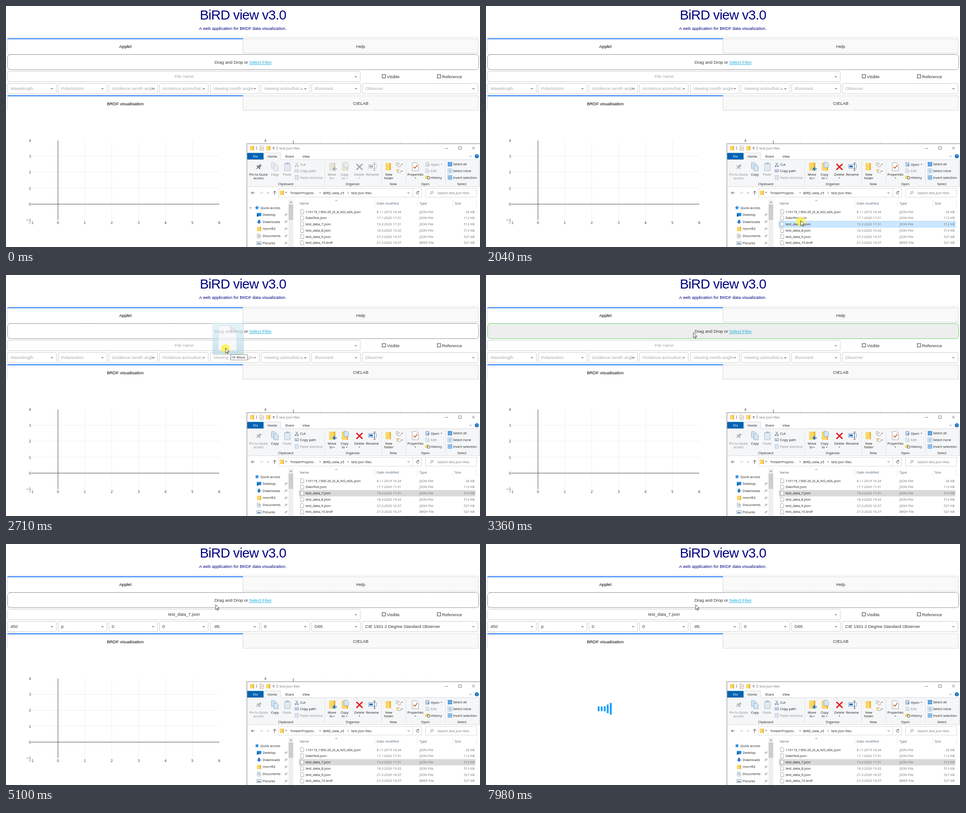
Recreate the animation shown at these times as an HTML page. Size 1049x534 px, loop 8 s.

```html
<!DOCTYPE html>
<html lang="en">
<head>
<meta charset="utf-8">
<title>BRDF viewer</title>
<style>
  html, body { margin: 0; width: 100%; height: 100%; overflow: hidden; background: #fff; }
  svg { display: block; width: 100%; height: 100%; }
  text { font: 9.6px "Liberation Sans", Arial, sans-serif; fill: #333; white-space: pre; }
  .mid { text-anchor: middle; }
  .end { text-anchor: end; }
  .title { font-size: 29.5px; letter-spacing: -.656px; fill: navy; }
  .sub { font-size: 9.46px; fill: navy; }
  .black { fill: #000; }
  .link { fill: #1eaedb; text-decoration: underline; }
  .hint { fill: #aaa; }
  .plot text { font: 7.87px "DejaVu Sans", Verdana, sans-serif; fill: #444; }
  .win text { font: 7.4px "Open Sans", "Noto Sans", sans-serif; fill: #1a1a1a; }
  .win .soft { fill: #707070; }
  .win .head { fill: #4c607a; }
  .win .white { fill: #fff; }
  .needs { opacity: .55; filter: grayscale(.75); }
  .picked .needs { opacity: 1; filter: none; }
  .never, .picked .pin { opacity: .5; }
  .cross { stroke: #5b6b85; }
  .picked .cross { stroke: #e0141c; }
</style>
</head>
<body>
<svg id="stage" viewBox="0 0 1049 534"></svg>
<script>
const LOOP = 8000;
const text = (x, y, s, cls = '') => `<text x="${x}" y="${y}" dy=".35em" class="${cls}">${s}</text>`;
const rect = (x, y, w, h, fill = 'none', stroke = 'none', more = '') =>
  `<rect x="${x}" y="${y}" width="${w}" height="${h}" fill="${fill}" stroke="${stroke}" ${more}/>`;
const path = (d, stroke = '#444', fill = 'none', more = '') =>
  `<path d="${d}" stroke="${stroke}" fill="${fill}" ${more}/>`;
const group = (attrs, ...parts) => `<g ${attrs}>${parts.join('')}</g>`;
const range = (a, b) => Array.from({ length: b - a + 1 }, (_, i) => a + i);
const caret = (x, y, color = '#999', r = 3.3) => path(`M${x - r} ${y}h${2 * r}l${-r} ${r}z`, 'none', color);
const chevron = (x, y, dx, dy, color = '#555') =>
  path(dx ? `M${x - dx} ${y - 2}l${2 * dx} 2l${-2 * dx} 2` : `M${x - 2.5} ${y - dy}l2.5 ${2 * dy}l2.5 ${-2 * dy}`, color);

/* ---- web page ---- */
function tabs(y, left, right) {
  return rect(524.5, y + .5, 520.5, 32, '#f9f9f9', '#d6d6d6') +
    path(`M3.5 ${y}v33`, '#d6d6d6') + rect(3, y - .5, 521.5, 2, '#1975fa') +
    text(264, y + 18, left, 'mid black') + text(785, y + 17.5, right, 'mid');
}

function dropdown(x, y, w) {
  return rect(x + .5, y + .5, w, 23, '#fff', '#ccc', 'rx="2.6"');
}

const columns = [3, 115, 227, 339, 452, 564, 676, 788];
const hints = ['Wavelength', 'Polarization', 'Incidence zenith angle', 'Incidence azimuthal...',
  'Viewing zenith angle', 'Viewing azimuthal a...', 'Illuminant', 'Observer'];
const values = ['450', 'p', '0', '0', '-85', '0', 'D65', 'CIE 1931 2 Degree Standard Observer'];
const rowTexts = (list, cls) => list.map((s, i) => text(columns[i] + 7, 183, s, cls)).join('');

function checkbox(x, label) {
  return rect(x + .5, 152, 7.5, 7.5, '#fff', '#333') + text(x + 11, 156.5, label);
}

function plot(id, dx) {
  const px = v => 115 + 59.5 * v, py = v => 439 - 35.25 * v;
  const name = v => v < 0 ? '−' + -v : v;
  return group(`id="${id}" class="plot" transform="translate(${dx})"`,
    path(range(1, 5).map(v => `M${px(v)} 298V474`).join('') +
      range(1, 3).map(v => `M56 ${py(v)}H472`).join(''), '#eee'),
    path('M115 298V474M56 439H472', '#444'),
    ...range(-1, 4).map(v => text(55.5, py(v), name(v), 'end')),
    ...range(-1, 6).map(v => text(px(v), 480.5, name(v), 'mid')));
}

const loader = (id, x) => group(`id="${id}"`,
  ...range(0, 4).map(i => rect(x + 6.7 * i, 0, 4, 10, '#119dff')));

const page =
  text(524.5, 20, 'BiRD view v3.0', 'mid title') +
  text(524, 50, 'A web application for BRDF data visualization.', 'mid sub') +
  path('M3 69H1045', '#e1e1e1') + tabs(72, 'Applet', 'Help') +
  rect(3.5, 107.5, 1042.5, 33.5, '#fff', '#333', 'id="zone"') +
  group('id="prompt"', text(461.5, 125, 'Drag and Drop or'), text(538, 125, 'Select Files', 'link')) +
  loader('zoneLoader', 508.4) +
  group('id="lower"',
    dropdown(3, 144, 780.5), caret(774, 155.5),
    columns.map((x, i) => dropdown(x, 171, i < 7 ? 108 : 256)).join(''),
    group('id="hints"', text(394, 156, 'File name', 'mid hint'), rowTexts(hints, 'hint')),
    group('id="values"', text(394, 156, 'test_data_7.json', 'mid'), rowTexts(values, ''),
      path('M956 155.5l2 2.2l3.8-4.5', '#222', 'none', 'stroke-width="1.3"')),
    columns.map((x, i) => caret(x + (i < 7 ? 98.5 : 246.5), 182)).join(''),
    checkbox(832, 'Visible'), checkbox(954, 'Reference'),
    tabs(198.5, 'BRDF visualisation', 'CIELAB'),
    plot('plotA', 0), plot('plotB', 521)) +
  loader('plotLoader', 247.3);

/* ---- file window ---- */
const folder = (x, y, w, h) =>
  rect(x, y, w, h, '#fbd667') + path(`M${x + w * .7} ${y}h${w * .3}v${h}h${-w * .2}z`, 'none', '#e8b53c');
const sheet = (x, y, w, h, fill = '#fff', stroke = '#8b8b8b') =>
  path(`M${x} ${y}h${w * .65}l${w * .35} ${w * .35}V${y + h}h${-w}z`, stroke, fill, 'stroke-width=".8"');
const tick = (x, y, k) => path(`M${x} ${y}l${2 * k} ${2.5 * k}l${4 * k} ${-5 * k}`, '#c4501b', 'none', `stroke-width="${k * 1.2}"`);
const pages = (x, y) => sheet(x, y, 10, 13, '#d5e6f5', '#7d9cbc') + sheet(x + 5, y + 5, 10, 13, '#d5e6f5', '#7d9cbc');
const drop = (x, y) => caret(x, y, '#333', 1.7);

const titleBar =
  folder(540, 310, 9, 10) + path('M554.5 311v8M600 311v8', '#777') + sheet(562, 310, 8, 10) + tick(563.5, 315, .8) +
  folder(576, 310, 9, 10) + path('M590 314h4.5', '#333') + drop(592.2, 316) +
  text(605, 315, 'test json files', 'soft') +
  path('M971.5 315.5h7M1001.5 312h6v6h-6zM1031.5 312l6 6m0-6l-6 6', '#555', 'none', 'stroke-width=".8"') +
  rect(534, 325.5, 36, 15, '#0063b1') + text(552, 333, 'File', 'mid white') +
  rect(534, 340.5, 515, 60, '#f5f6f7', '#dadbdc') + path('M571.5 341v-15.5h36.5V341', '#dadbdc', '#f5f6f7') +
  text(589.5, 333, 'Home', 'mid') + text(627.5, 333, 'Share', 'mid') + text(664, 333, 'View', 'mid') +
  chevron(1028, 333, 0, -1.2, '#777') +
  '<circle cx="1042" cy="333" r="4.6" fill="#1272c8"/>' + text(1042, 333, '?', 'mid white');

const ribbon =
  group('class="pin"', path('M552 362l5-5-3-2 2-2 3 1 3-4 4 4-4 3 1 3-2 2-2-3z', 'none', '#7d8288'),
    text(559, 373, 'Pin to Quick', 'mid'), text(559, 381.5, 'access', 'mid')) +
  group('class="needs"', pages(587.5, 347), text(595, 373, 'Copy', 'mid'),
    path('M641 347l5 7m0-7l-5 7', '#4a6da0'), '<circle cx="641" cy="355" r="1.3" fill="none" stroke="#4a6da0"/><circle cx="646" cy="355" r="1.3" fill="none" stroke="#4a6da0"/>',
    text(651, 351, 'Cut'), rect(639.5, 362.5, 8, 5, '#fff', '#4a6da0', 'stroke-width=".8"'), path('M641 365.5h5', '#4a6da0'), text(651, 365.5, 'Copy path')) +
  group('class="never"', rect(616.5, 349, 12.5, 16, '#cfdff0', '#5f7fa5'), rect(619.5, 347, 6.5, 3.5, '#5f7fa5'),
    text(622, 373, 'Paste', 'mid'), rect(640, 375.5, 7, 8.5, '#dbe8f5', '#4a6da0', 'stroke-width=".8"'), path('M641.5 381l3.5-3', '#1272c8'), text(651, 380, 'Paste shortcut')) +
  group('class="needs"', folder(715, 347, 14, 18), path('M732 361h-7m3-4l-4 4 4 4', '#1878cc', 'none', 'stroke-width="2.2"'),
    text(721.5, 373, 'Move', 'mid'), text(719.5, 381.5, 'to', 'mid'), drop(726, 381),
    folder(743, 347, 14, 18), sheet(748, 346, 10, 12, '#d5e6f5', '#7d9cbc'),
    text(749, 373, 'Copy', 'mid'), text(746.5, 381.5, 'to', 'mid'), drop(754, 381),
    path('M775.5 350l13.5 13m0-13l-13.5 13', null, 'none', 'class="cross" stroke-width="2.8"'), text(782, 373, 'Delete', 'mid'), drop(782, 380.5),
    rect(802.5, 351.5, 17, 8, '#fff', '#7d94b5'), rect(804, 353.5, 8, 4, '#1878cc'), path('M813 348h5m-2.5 0v16m-2.5 0h5', '#44546c'),
    text(811, 373, 'Rename', 'mid')) +
  folder(840, 348, 12, 16) + text(847, 373, 'New', 'mid') + text(847, 381.5, 'folder', 'mid') +
  group('', sheet(864, 347, 6, 6), sheet(867, 350, 6, 6), drop(876.5, 350), folder(864, 362, 5, 6), sheet(867, 363, 6, 6), drop(876.5, 365)) +
  sheet(899, 347, 14, 18) + tick(902, 356, 1.4) + text(906, 373, 'Properties', 'mid') + drop(906, 380.5) +
  group('class="needs"', rect(929, 347, 7, 8, '#dcebf8', '#4a6da0', 'stroke-width=".8"'), path('M931 352h5m-2-2l2 2-2 2', '#1878cc'), text(940, 351, 'Open'), drop(963.5, 350)) +
  group('class="never"', sheet(929, 361, 7, 8, '#e6eef7', '#4a6da0'), path('M932 367l4-4', '#1878cc'), text(940, 365.5, 'Edit')) +
  folder(928, 376, 7, 7) + '<circle cx="935" cy="381" r="3" fill="#e7f4e7" stroke="#444"/>' + text(940, 380, 'History') +
  [['Select all', 350.5, '#3b98e8'], ['Select none', 365.5, '#fff'], ['Invert selection', 380, '#9fcdf5']].map(([s, y, c]) =>
    [0, 5].map(i => [0, 5].map(j => rect(978 + i, y - 4.5 + j, 4, 4, c, '#5a9bd5', 'stroke-width=".7"')).join('')).join('') + text(989.5, y, s)).join('') +
  path('M705.5 344v54M831.5 344v54M885.5 344v54M972.5 344v54M1047.5 344v54', '#e0e1e2') +
  [['Clipboard', 619], ['Organize', 767], ['New', 857], ['Open', 928], ['Select', 1009]].map(([s, x]) => text(x, 394.5, s, 'mid')).join('');

const address =
  path('M550 414h-7m3-3l-3 3 3 3M594.5 418v-8m-3.5 3.5l3.5-3.5 3.5 3.5', '#444') +
  path('M561.5 414h7m-3-3l3 3-3 3', '#ccc') + chevron(580, 414, 0, 1, '#888') +
  rect(603.5, 404.5, 297, 19, '#fff', '#d9d9d9') + rect(900.5, 404.5, 19.5, 19, '#fff', '#d9d9d9') +
  rect(928.5, 404.5, 113, 19, '#fff', '#d9d9d9') + folder(606, 409, 9, 10) +
  text(618, 412.5, '«') + text(629, 414, 'TimberProjects') + chevron(695, 414, .8, 0) +
  text(702, 414, 'BiRD_view_v5') + chevron(757, 414, .8, 0) + text(764, 414, 'test json files') +
  chevron(891, 414, 0, 1.2) + path('M913 412.3a2.8 2.8 0 1 0 .6 2.6M913.4 410v2.5h-2.5', '#444') +
  '<circle cx="943" cy="413" r="2.4" fill="none" stroke="#888"/>' + path('M941.3 414.8l-2.6 3', '#888') +
  text(955, 414, 'Search test json files', 'soft');

const places = ['Desktop', 'Downloads', 'morrift2', 'Documents', 'Pictures'];
const placeIcons = [
  y => rect(555, y - 4, 10, 7, '#1c86d8') + rect(555, y, 4, 4, '#1b5c94'),
  y => path(`M558 ${y - 4.5}h4v4h3l-5 5-5-5h3z`, 'none', '#1c78c8'),
  y => folder(555.5, y - 4.5, 9, 9.5),
  y => sheet(556, y - 4.5, 7.5, 9) + path(`M558 ${y - 1}h4m-4 2h4`, '#3a7ab8'),
  y => rect(555, y - 3.5, 10, 7, '#e9f3fa', '#8b8b8b', 'stroke-width=".8"') + path(`M556 ${y + 2}l3-3 2 2 1-1 2 2z`, 'none', '#3a7ab8'),
];
const sidebar =
  path('M538.5 446l2.5 2.5 2.5-2.5', '#444', 'none', 'id="expander"') +
  path('M555.5 442l1.5 3 3.3.4-2.4 2.2.6 3.4-3-1.6-3 1.6.6-3.4-2.4-2.2 3.3-.4z', 'none', '#2a8be0') +
  text(563, 447, 'Quick access') +
  places.map((s, i) => {
    const y = 462.5 + 15.7 * i;
    return placeIcons[i](y) + text(568, y, s) +
      path(`M616.5 ${y + 3}l2-2m-1.5-1.5l3 3m-1.5-4l2.5 2.5m-1-4.5l3 3m-3.5-1.5l-1.5 2m4-1l-2 1.5`, '#777', 'none', 'stroke-width=".8"');
  }).join('') +
  rect(625, 429, 11, 105, '#f0f0f0') + rect(625.5, 440, 10, 34, '#cdcdcd') + chevron(630.5, 435, 0, -1.2, '#333');

const ROW = 13.77, rowTop = i => 449.2 + ROW * i;
const files = [['110119_1500-20_i0_A_NO_ADL.json', '8.11.2019 16.34', 26], ['DataTest.json', '17.1.2020 17.31', 112],
  ['test_data_7.json', '19.2.2020 17.31', 512], ['test_data_8.json', '18.3.2020 19.32', 513],
  ['test_data_9.json', '27.3.2020 16.37', 527], ['test_data_10.brdf', '27.3.2020 16.37', 527]];
const listing =
  path('M816.5 430v15M910.5 430v15M989.5 430v15M1041.5 430v15', '#e5e5e5') + chevron(731, 431, 0, -1, '#777') +
  [['Name', 650], ['Date modified', 820.5], ['Type', 915], ['Size', 993.5]].map(([s, x]) => text(x, 437, s, 'head')).join('') +
  rect(648, 0, 391, 13.6, '#e5f3ff', 'none', 'id="hover"') +
  rect(648.5, rowTop(2) + .3, 390, 13, '#cce8ff', '#99d1ff', 'id="chosen"') +
  files.map(([name, date, kb], i) => {
    const y = rowTop(i) + 6.8;
    return sheet(652, y - 5, 7, 9.5) + text(663, y, name) + text(820.5, y, date, 'soft') +
      text(915, y, name.split('.')[1].toUpperCase() + ' File', 'soft') + text(1037, y, kb + ' KB', 'soft end');
  }).join('');

const win = group('id="win" class="win"',
  rect(530.5, 303, 530, 240, '#000', 'none', 'opacity=".06"'), rect(532, 304, 530, 240, '#000', 'none', 'opacity=".1"'),
  rect(533.5, 305.5, 530, 240, '#fff', '#a8a8a8'), titleBar, ribbon, address, sidebar, listing);

/* ---- pointer, origin at its tip ---- */
const pointer = group('id="pointer"',
  group('id="ghost" opacity=".72"', rect(-28, -54, 68, 69, '#555', 'none', 'opacity=".35"'),
    rect(-29, -56, 68, 69, 'url(#glass)'), sheet(-16, -49.5, 41, 55.5, '#f4f6f7', '#c3cacf'), path('M10.7-49.5v14.3H25z', '#b9c0c6', '#dfe4e8', 'stroke-width=".8"')),
  '<circle id="press" cx="0" cy="1.5" r="10" fill="#fbf14a" opacity=".82"/>',
  path('M0 0V11.2L2.6 8.7L4.3 12.6L6 11.8L4.3 8.1H7.8Z', '#111', '#fff', 'stroke-width=".8"'),
  group('id="tip" class="win"', rect(11.5, 14.5, 37, 12, '#fff', '#888'),
    path('', '#1b4f9c', 'none', 'id="tipIcon"'), text(24.5, 20.5, '', 'tipLabel')));

const stage = document.getElementById('stage');
stage.innerHTML = '<defs><linearGradient id="glass" x2="0" y2="1"><stop stop-color="#dff1f9"/>' +
  '<stop offset="1" stop-color="#b4d9ea"/></linearGradient></defs>' + page + win + pointer;

const el = id => document.getElementById(id);
const show = (id, on) => { el(id).style.display = on ? '' : 'none'; };
const set = (id, attrs) => { for (const k in attrs) el(id).setAttribute(k, attrs[k]); };

/* time, x, y of the pointer tip */
const trail = [[0, 668, 560], [70, 676, 533], [400, 699, 521], [770, 702, 505], [850, 702, 499], [880, 700, 497],
  [1150, 697, 477], [2040, 696.5, 476], [2110, 690, 467], [2300, 648, 405], [2500, 545, 250], [2650, 496, 181],
  [2710, 486, 162], [2830, 467, 138], [2950, 459, 128], [3510, 459, 128], [3650, 464, 134.5], [LOOP, 464, 134.5]];

function tipAt(t) {
  const i = trail.findIndex(p => p[0] > t);
  const [a, b] = [trail[i - 1], trail[i]], k = (t - a[0]) / (b[0] - a[0]);
  return [a[1] + (b[1] - a[1]) * k, a[2] + (b[2] - a[2]) * k];
}

function stretch(ms) {
  const p = ms < 0 ? 2 : ms % 1200 / 240;
  const k = Math.max(0, p < 1 ? p : 2 - p);
  return .4 + .6 * k * k * (3 - 2 * k);
}

function drawLoader(id, on, ms, cy) {
  show(id, on);
  [...el(id).children].forEach((bar, i) => {
    const h = 26.2 * stretch(ms - 100 * i);
    bar.setAttribute('height', h);
    bar.setAttribute('y', cy - h / 2);
  });
}

function render(t) {
  const [x, y] = tipAt(t);
  const picked = t >= 1850, dragging = t >= 2090 && t < 3345;
  const loading = t >= 3510 && t < 4690, filled = t >= 5100;
  const over = t > 2650 && t < 3510 && y < 141;

  set('zone', {
    height: loading ? 40 : 33.5, rx: loading ? .5 : 6,
    fill: over ? '#eee' : '#fff', stroke: over ? '#6c6' : '#333', 'stroke-dasharray': over ? 'none' : '2 1.6',
  });
  show('prompt', !loading);
  set('lower', { transform: `translate(0 ${loading ? 6.5 : 0})` });
  show('hints', !filled);
  show('values', filled);
  show('plotA', t < 6230);
  show('plotB', t < 6255);
  drawLoader('zoneLoader', loading, t - 3490, 127.6);
  drawLoader('plotLoader', t >= 6230, t < 6255 ? -1 : t - 6130, 365.2);

  el('win').classList.toggle('picked', picked);
  set('expander', { opacity: Math.max(0, Math.min(1, (500 - t) / 350)) });
  const row = Math.floor((y - rowTop(0)) / ROW);
  show('hover', !picked && y < 534 && row < 6);
  set('hover', { y: rowTop(row) });
  show('chosen', picked);
  const focused = t < 2200;
  set('chosen', { fill: focused ? '#cce8ff' : '#d9d9d9', stroke: focused ? '#99d1ff' : '#d9d9d9' });

  set('pointer', { transform: `translate(${x} ${y})` });
  show('ghost', dragging);
  show('press', picked && t < 3345);
  show('tip', dragging && y < 305);
  set('tipIcon', { d: over ? 'M14 20.5h7m-3.5-3.5v7' : 'M13.5 20.5h7.5m-3-3l3 3-3 3' });
  stage.querySelector('.tipLabel').textContent = over ? 'Copy' : 'Move';
}

const start = performance.now();
function tickFrame() {
  render((performance.now() - start) % LOOP);
  requestAnimationFrame(tickFrame);
}
tickFrame();
</script>
</body>
</html>
```
